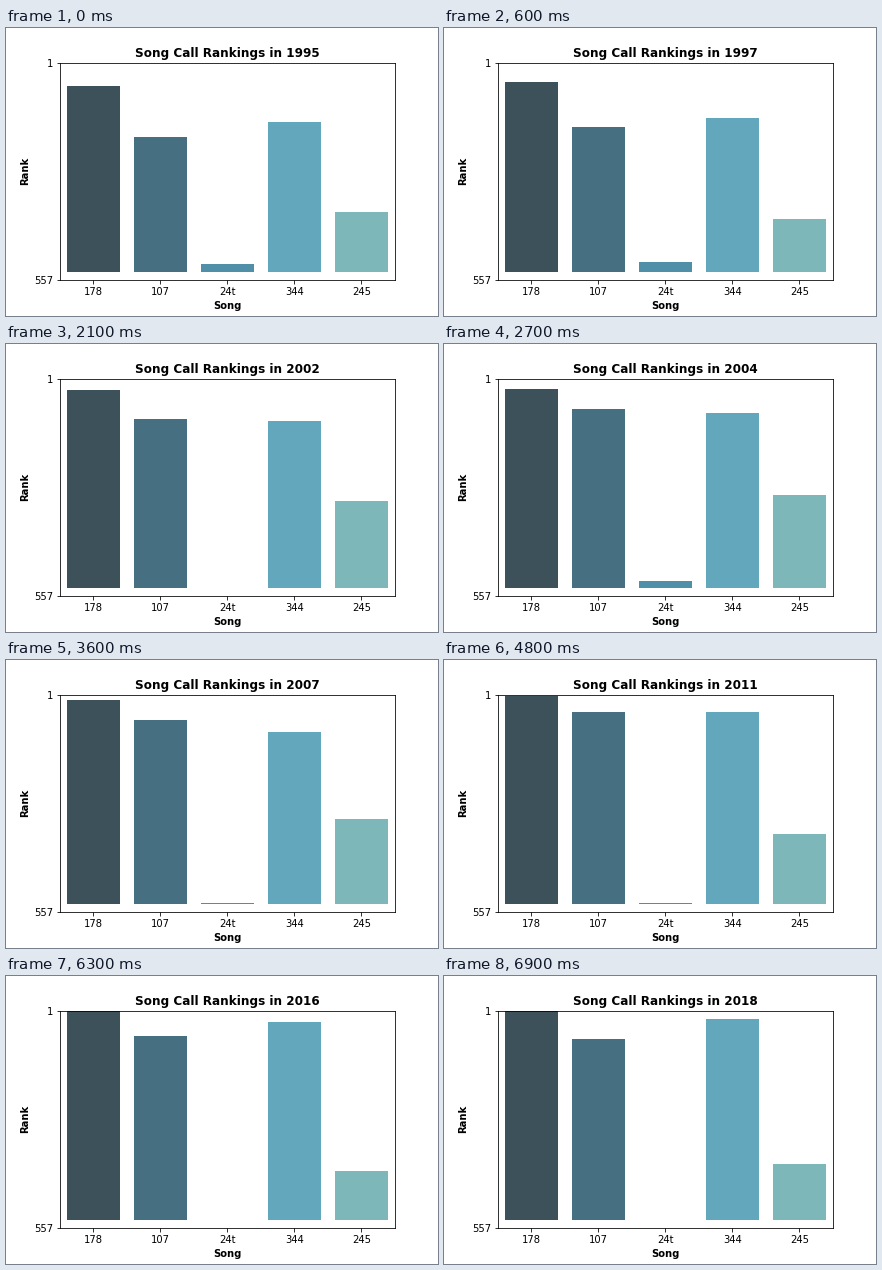
Write a matplotlib script that moves like this. It is 432x288 px and loops after 7.2 s.

```python
import colorsys

import matplotlib.pyplot as plt
import numpy as np
from matplotlib.animation import FuncAnimation
from matplotlib.colors import LinearSegmentedColormap

DPI = 72
WIDTH, HEIGHT = 432, 288
TOP, BOTTOM, BASE = 34.56, 252, 244  # stage heights, measured downwards

YEARS = np.arange(1995, 2019)
KEY_YEARS = [1995, 2000, 2004, 2007, 2011, 2013, 2018]


def drift(keys, swing=0, peak=0, period=1):
    """Bar tops eased through the key years, swaying in between."""
    line = np.interp(YEARS, KEY_YEARS, keys)
    segment = np.interp(YEARS, KEY_YEARS, range(len(KEY_YEARS)))
    sway = swing * np.cos(2 * np.pi * (YEARS - peak) / period)
    tops = line + sway * abs(np.sin(np.pi * segment))
    return np.minimum(np.round(tops), BASE)


SONGS = {
    "178": drift([58, 47, 45, 40, 36, 35, 35]),
    "107": drift([109, 85, 65, 60, 52, 55, 63]),
    "24t": drift([236, 240, 237, 243, 243, 239, BASE], 6, 2002, 14),
    "344": drift([94, 85, 69, 72, 52, 51, 43]),
    "245": drift([184, 170, 151, 159, 174, 183, 188], 13, 1997, 17),
}


def desaturate(rgb, amount=0.75):
    h, l, s = colorsys.rgb_to_hls(*rgb[:3])
    return colorsys.hls_to_rgb(h, l, s * amount)


def palette():
    """Dark grey blended into blue and green, slightly muted."""
    ends = plt.get_cmap("GnBu_r")(np.linspace(0, 1, 4)[1:-1])
    blend = LinearSegmentedColormap.from_list("blend", ["#333333", *ends])
    return [desaturate(c) for c in blend(np.linspace(0, 1, 8)[1:6])]


tops = np.array(list(SONGS.values()))
slots = range(len(SONGS))

fig, ax = plt.subplots(figsize=(WIDTH / DPI, HEIGHT / DPI), dpi=DPI)
fig.subplots_adjust(left=0.125, right=0.9, bottom=0.125, top=0.88)
bars = ax.bar(slots, BASE - tops[:, 0], bottom=tops[:, 0], width=0.8,
              color=palette())
ax.set_xlim(-0.5, len(SONGS) - 0.5)
ax.set_ylim(BOTTOM, TOP)
ax.set_xticks(slots, list(SONGS))
ax.set_yticks([TOP, BOTTOM], ["1", "557"])
ax.set_xlabel("Song", fontweight="bold")
ax.set_ylabel("Rank", fontweight="bold")
title = ax.set_title("", fontsize=12, fontweight="bold")


def update(i):
    title.set_text(f"Song Call Rankings in {YEARS[i]}")
    for bar, top in zip(bars, tops[:, i]):
        bar.set_y(top)
        bar.set_height(BASE - top)
        bar.set_visible(bool(top < BASE))
    return [title, *bars]


anim = FuncAnimation(fig, update, frames=len(YEARS), interval=300,
                     repeat=True, repeat_delay=0, blit=False)
plt.show()
```
